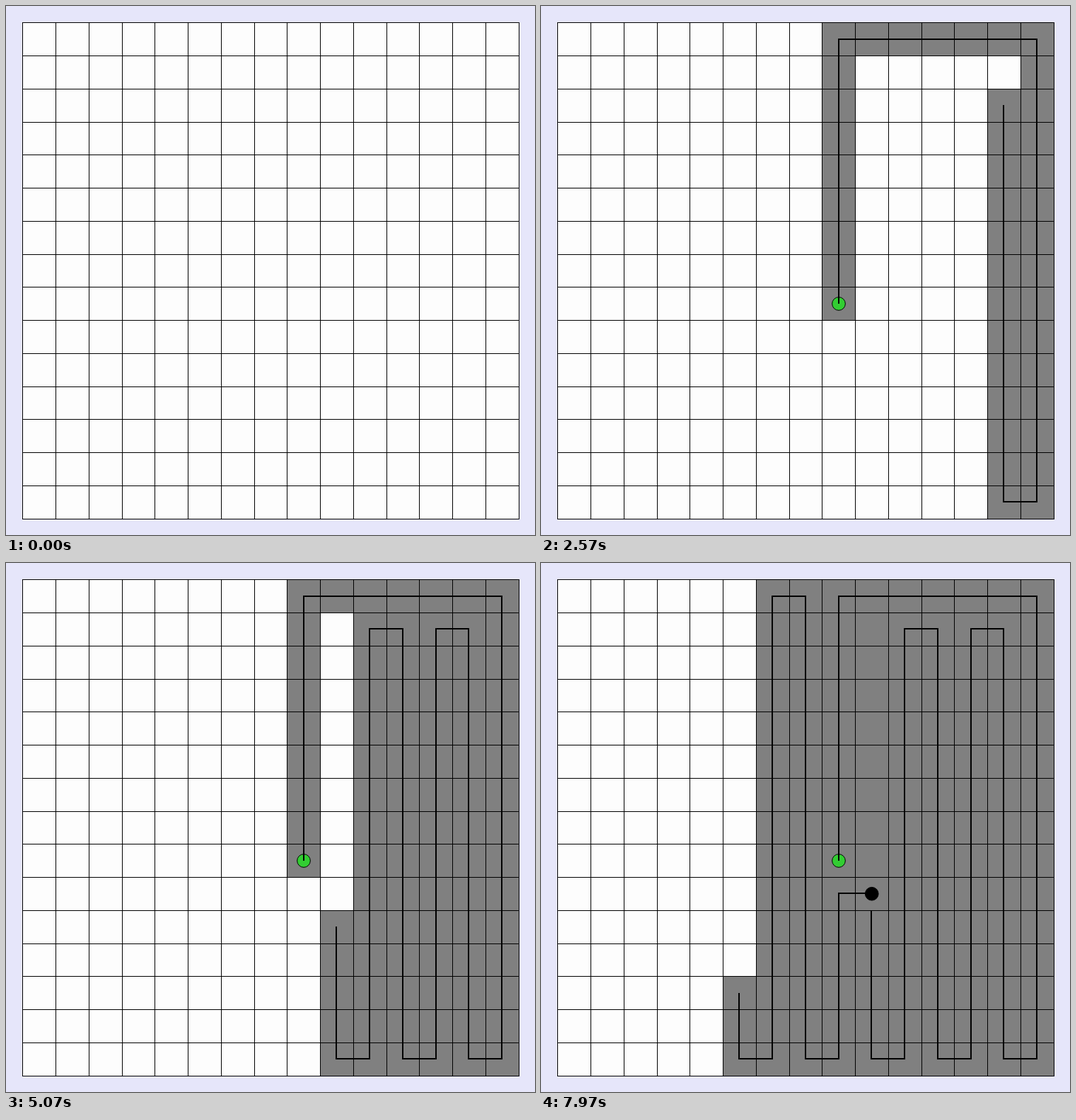
Animation of 748x748 px, one loop 8000 ms. Source, as an HTML page with a canvas:

```html
<!DOCTYPE html>
<html lang="en">
<head>
<meta charset="utf-8">
<title>Depth-first grid coverage</title>
<style>
  html, body { margin: 0; width: 100%; height: 100%; overflow: hidden; background: #e6e6fa; }
  canvas { display: block; }
</style>
</head>
<body>
<canvas id="stage" width="748" height="748"></canvas>
<script>
const ctx = document.getElementById('stage').getContext('2d');
const CELLS = 15, UNIT = 748 / (CELLS + 1);
const LOOP = 8000, START = 423, STEP = 51.7;

const edge = k => Math.round((k + 0.5) * UNIT);
const centre = k => Math.round((k + 1) * UNIT - 0.01);

// Expands corner points into one cell per step.
function walk(corners) {
  const cells = [corners[0]];
  for (const [toX, toY] of corners.slice(1)) {
    let [x, y] = cells[cells.length - 1];
    while (x !== toX || y !== toY) {
      x += Math.sign(toX - x);
      y += Math.sign(toY - y);
      cells.push([x, y]);
    }
  }
  return cells;
}

const outward = walk([[8, 8], [8, 0], [14, 0], [14, 14], [13, 14], [13, 1], [12, 1],
  [12, 14], [11, 14], [11, 1], [10, 1], [10, 14], [9, 14], [9, 1]]);
const branch = walk([[9, 9], [8, 9], [8, 14], [7, 14], [7, 0], [6, 0], [6, 14], [5, 14], [5, 0]]);
const RETREAT = 8;                              // cells from the dead end back to the branch
const deadEnd = outward.length - 1;
const branchStart = deadEnd + RETREAT;

function trail(cells) {
  ctx.beginPath();
  for (const [x, y] of cells) ctx.lineTo(centre(x), centre(y));
  ctx.stroke();
}

function dot([x, y], fill) {
  ctx.beginPath();
  ctx.arc((x + 1) * UNIT + 0.25, (y + 1) * UNIT + 0.25, UNIT / 5, 0, 2 * Math.PI);
  ctx.fillStyle = fill;
  ctx.fill();
  ctx.lineWidth = 1;
  ctx.stroke();
}

function draw(time) {
  const step = Math.floor((time - START) / STEP);
  const first = outward.slice(0, Math.max(0, step + 1));
  const second = branch.slice(0, Math.max(0, step - branchStart + 1));
  const low = edge(0), span = edge(CELLS) - low;

  ctx.fillStyle = '#e6e6fa';
  ctx.fillRect(0, 0, 748, 748);
  ctx.fillStyle = '#fdfdfd';
  ctx.fillRect(low, low, span, span);

  ctx.fillStyle = '#808080';
  for (const [x, y] of [...first, ...second])
    ctx.fillRect(edge(x), edge(y), edge(x + 1) - edge(x), edge(y + 1) - edge(y));

  ctx.fillStyle = ctx.strokeStyle = '#000';
  for (let k = 0; k <= CELLS; k++) {
    ctx.fillRect(edge(k), low, 1, span + 1);
    ctx.fillRect(low, edge(k), span + 1, 1);
  }
  if (step < 0) return;

  dot(outward[0], '#32cd32');
  if (second.length) dot(branch[0], '#000');

  // Retreating clears whole cells, so the trail then ends on a cell edge.
  const cleared = Math.min(RETREAT, step - deadEnd);
  if (cleared > 0) {
    first.length -= cleared + 1;
    first.push([9, 1 + cleared + 0.5]);
    first.splice(-2, 1, [9, 14], first[first.length - 1]);
    first.pop();
  }
  ctx.lineWidth = 2;
  trail(first);
  trail(second);
}

function tick() {
  draw(performance.now() % LOOP);
  requestAnimationFrame(tick);
}
tick();
</script>
</body>
</html>
```
